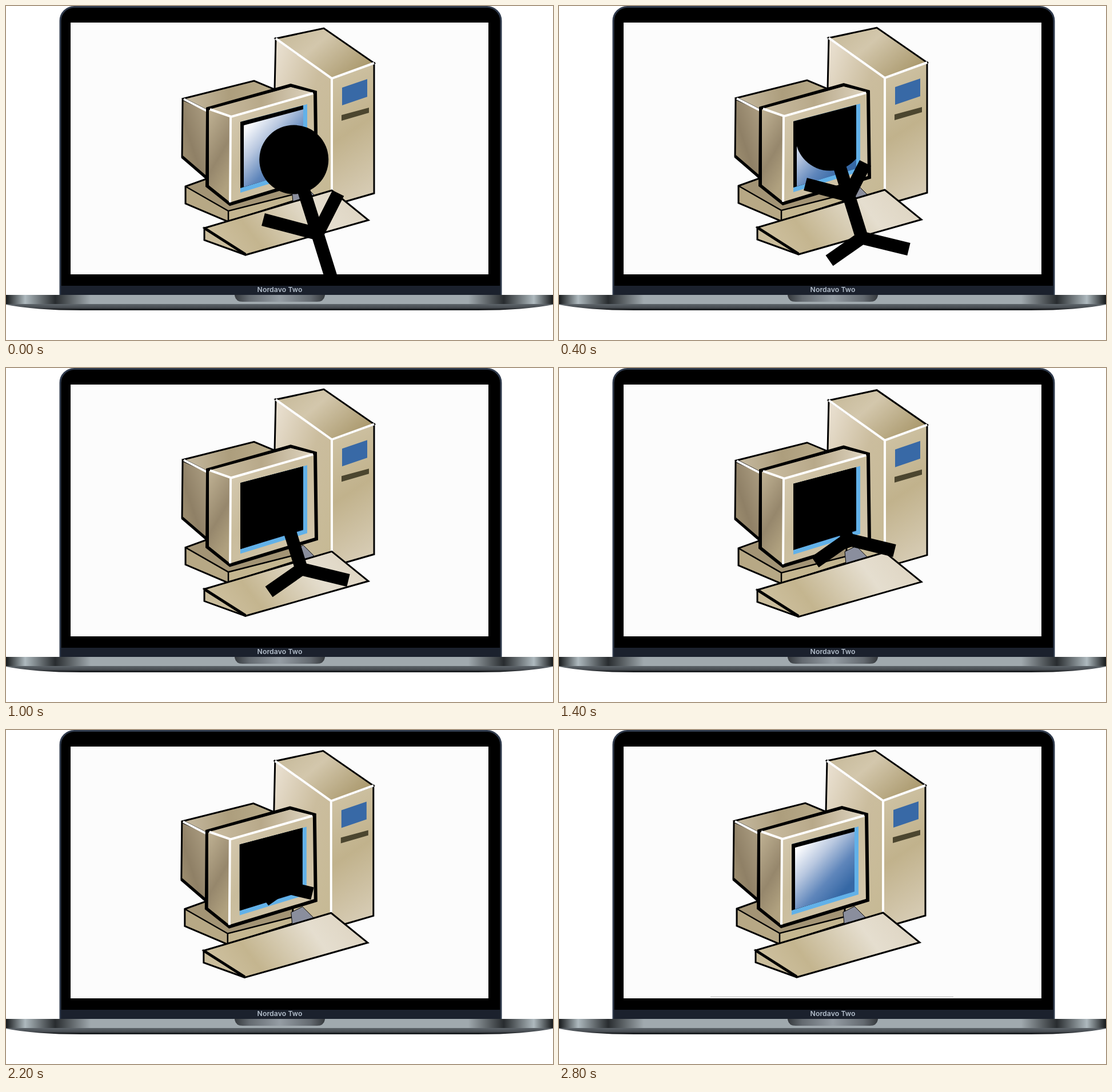
An HTML page that plays this animation: 957x585 px, repeating every 3 s.

```html
<!DOCTYPE html>
<html lang="en">
<head>
<meta charset="utf-8">
<title>Into the screen</title>
<style>
  html, body { margin: 0; width: 100%; height: 100%; overflow: hidden; background: #fff; }
  svg { display: block; width: 957px; height: 585px; }
  text { font: 600 12.2px Inter, sans-serif; letter-spacing: .1px; fill: #b3becb; text-anchor: middle; }
  .ink { stroke: #000; stroke-width: 3; }
  .bold { stroke: #000; stroke-width: 6; }
  .line { fill: none; stroke: #000; stroke-width: 2.5; }
  .heavy { fill: none; stroke: #000; stroke-width: 5; }
  .shine { fill: none; stroke: #fff; stroke-width: 4; }
  #limbs { fill: none; stroke: #000; stroke-width: 22.5; }
  #head { stroke: #000; stroke-width: 121; stroke-linecap: round; }
</style>
</head>
<body>
<svg viewBox="0 0 957 585">
  <defs>
    <linearGradient id="towerSide" x1="0" y1="0" x2="1" y2="1">
      <stop offset="0" stop-color="#ece3d5"/><stop offset=".5" stop-color="#cbbd9e"/><stop offset="1" stop-color="#c6b994"/>
    </linearGradient>
    <linearGradient id="towerTop" x1="0" y1="0" x2="1" y2=".6">
      <stop offset="0" stop-color="#c4b796"/><stop offset=".45" stop-color="#d3c7ac"/><stop offset="1" stop-color="#ac9b70"/>
    </linearGradient>
    <linearGradient id="towerFront" x1=".3" y1="0" x2=".5" y2="1">
      <stop offset="0" stop-color="#cfc3a5"/><stop offset=".5" stop-color="#c1b28c"/><stop offset="1" stop-color="#d6cbb3"/>
    </linearGradient>
    <linearGradient id="backTop">
      <stop offset="0" stop-color="#c6baa1"/><stop offset=".5" stop-color="#ad9e7d"/><stop offset="1" stop-color="#b9ac8b"/>
    </linearGradient>
    <linearGradient id="backSide" x1="1" y1="0" x2="0" y2="1">
      <stop offset="0" stop-color="#b0a286"/><stop offset=".6" stop-color="#8f8066"/><stop offset="1" stop-color="#a39474"/>
    </linearGradient>
    <linearGradient id="boxTop">
      <stop offset="0" stop-color="#cabda2"/><stop offset=".5" stop-color="#b8a98a"/><stop offset="1" stop-color="#ded4c0"/>
    </linearGradient>
    <linearGradient id="boxSide" x1="0" y1="0" x2=".4" y2="1">
      <stop offset="0" stop-color="#c0b294"/><stop offset=".6" stop-color="#96876c"/><stop offset="1" stop-color="#b0a17f"/>
    </linearGradient>
    <linearGradient id="boxFront" x1="0" y1="0" x2="1" y2="1">
      <stop offset="0" stop-color="#ddd2bd"/><stop offset=".5" stop-color="#c9bc9c"/><stop offset="1" stop-color="#d6cab1"/>
    </linearGradient>
    <linearGradient id="glass" gradientUnits="userSpaceOnUse" x1="420" y1="210" x2="502" y2="285">
      <stop offset="0" stop-color="#fff"/><stop offset=".35" stop-color="#b9c8e0"/><stop offset=".7" stop-color="#5f86bb"/><stop offset="1" stop-color="#3668a5"/>
    </linearGradient>
    <linearGradient id="keys" x1="0" y1=".8" x2="1" y2=".5">
      <stop offset="0" stop-color="#d0c3a3"/><stop offset=".3" stop-color="#c4b58f"/><stop offset=".75" stop-color="#e5decf"/><stop offset="1" stop-color="#dfd6c4"/>
    </linearGradient>
    <linearGradient id="metal" x2=".5" spreadMethod="reflect">
      <stop offset="0" stop-color="#16191b"/><stop offset=".07" stop-color="#aeb9be"/><stop offset=".18" stop-color="#282c2f"/><stop offset=".31" stop-color="#a0a9ae"/>
    </linearGradient>
    <linearGradient id="under" x2="0" y2="1">
      <stop offset="0" stop-color="#646c72"/><stop offset=".65" stop-color="#474c51"/><stop offset=".9" stop-color="#15181b"/>
    </linearGradient>
    <linearGradient id="notch" x2=".5" spreadMethod="reflect">
      <stop offset="0" stop-color="#35393d"/><stop offset=".32" stop-color="#646a70"/><stop offset="1" stop-color="#959da4"/>
    </linearGradient>
    <clipPath id="display"><path d="M113 29H844V470H113Z"/></clipPath>
    <clipPath id="screen"><path d="M410 203L520 174V286L410 320Z"/></clipPath>
  </defs>

  <path d="M95 507V26A24.5 24.5 0 0 1 119.5 1.5H841.5A24.5 24.5 0 0 1 866 26V507Z" fill="#000" stroke="#303b4d" stroke-width="3"/>
  <path d="M96 490H865V507H96Z" fill="#1b212d"/>
  <path d="M113 29H844V470H113Z" fill="#fcfcfc"/>
  <text x="479" y="501">Nordavo Two</text>
  <path d="M0 520V523Q50 533 132 533H825Q907 533 957 523V520Z" fill="url(#under)"/>
  <path d="M0 506H957V522H0Z" fill="url(#metal)"/>
  <path d="M400 506H558Q557 518 544 518H414Q401 518 400 506Z" fill="url(#notch)"/>

  <g clip-path="url(#display)">
    <g id="computer">
      <path class="ink" d="M472 57L570 127V325L540 333L500 335L470 146Z" fill="url(#towerSide)"/>
      <path class="ink" d="M570 127L644 100V328L592 343L570 325Z" fill="url(#towerFront)"/>
      <path class="ink" d="M472 57L556 39L644 100L570 127Z" fill="url(#towerTop)"/>
      <path class="shine" d="M472 57L570 127L644 100M570 127V324"/>
      <path d="M588 143L632 128V159L588 174Z" fill="#3869a6"/>
      <path d="M587 191L635 178V187L587 201Z" fill="#4c462f"/>

      <path class="ink" d="M314 316L350 303H503V341L389 378L314 346Z" fill="#a39475"/>
      <path d="M316 318L389 360V376L316 345Z" fill="#b7a885"/>
      <path d="M389 360L502 331V340L389 376Z" fill="#c4b690"/>
      <path class="line" d="M314 316L389 359L503 330M389 359V378"/>
      <path d="M500 322L520 312L541 333L502 343Z" fill="#8a8e9d" stroke="#000"/>

      <path class="ink" d="M311 162L434 131L470 146L354 184Z" fill="url(#backTop)"/>
      <path class="ink" d="M309 164L354 184L352 303L308 264Z" fill="url(#backSide)"/>
      <path class="heavy" d="M308 264L352 302"/>
      <path class="shine" d="M311 163L352 184"/>
      <path class="bold" d="M353 180L498 139L541 151L543 301L392 347L352 315Z" fill="url(#boxFront)"/>
      <path d="M356 181L498 142L538 152L394 194Z" fill="url(#boxTop)"/>
      <path d="M355 182L393 194L391 343L355 314Z" fill="url(#boxSide)"/>
      <path class="shine" d="M357 181L394 194L537 153M393 194L392 344"/>

      <path d="M410 203L527 172V291L410 327Z" fill="#62b1e8"/>
      <path d="M410 203L520 174V285L410 319Z"/>
      <path d="M416 209L520 181V286L416 317Z" fill="url(#glass)"/>
      <path id="dark"/>

      <path class="ink" d="M347 389V410L419 436Z" fill="#cabd9c"/>
      <path class="ink" d="M347 389L570 323L634 375L419 436Z" fill="url(#keys)"/>
      <path class="heavy" d="M347 389L419 435"/>
    </g>
    <path id="rule" d="M265 467.5H690" stroke="#b4b4b4"/>
    <g id="headClip"><path id="head"/></g>
    <path id="limbs"/>
  </g>
</svg>
<script>
const $ = id => document.getElementById(id);
const set = (id, name, value) => $(id).setAttribute(name, value);
const STEP = 200, LOOP = 3000;
const INSIDE = 2, ARMS_IN = 5, GONE = 12, LIT = 13, LAST = 14;

// joints of the rigid figure, measured from the shoulder
const body = {
  head: [-33, -104], neck: [0, 0], handL: [-76, -20], handR: [29, -57],
  hip: [23, 74], footL: [-34, 114], footR: [105, 94]
};

// way of the shoulder: step, x, y, size
const climb = [
  [0, 545, 399, 1.25], [2, 507, 332, 1], [4, 500, 304, 1],
  [7, 482, 226, 1], [9, 477, 217, 1], [11, 473, 230, .6]
];

function along(keys, step) {
  const i = Math.max(1, keys.findIndex(k => k[0] >= step));
  const a = keys[i - 1], b = keys[i];
  const f = (step - a[0]) / (b[0] - a[0]);
  return a.map((v, n) => v + (b[n] - v) * f);
}

function pose(step) {
  const [, x, y, size] = along(climb, step);
  return Object.fromEntries(Object.entries(body)
    .map(([name, [dx, dy]]) => [name, [x + dx * size, y + dy * size]]));
}

const line = (...points) => "M" + points.map(p => p.join(" ")).join("L");

function drawFigure(step) {
  const p = pose(step), inside = step >= INSIDE;
  const arms = step < ARMS_IN
    ? line(p.head, p.neck) + line(p.handL, p.neck, p.handR) : "";
  set("limbs", "d", arms + line(p.neck, p.hip) + line(p.footL, p.hip, p.footR));
  // once inside, the head smears up to the top of the screen
  set("head", "d", line(p.head, [p.head[0], inside ? 100 : p.head[1] + .01]));
  set("headClip", "clip-path", inside ? "url(#screen)" : "none");

  const low = step < ARMS_IN
    ? [[520, p.handR[1]], p.neck, p.handL, [410, p.handL[1]]]
    : [[520, 285], [410, 319]];
  set("dark", "d", step > INSIDE ? line([410, 203], [520, 174], ...low) : "");
}

function draw(step) {
  // the drawing wobbles, then drifts up and left
  const drift = Math.max(0, step - 9);
  const dy = Math.cos(Math.PI * step / 4) - 1 - .4 * drift;
  set("computer", "transform", `translate(${-.6 * drift} ${dy})`);

  const figure = step < GONE;
  if (figure) drawFigure(step);
  for (const id of ["head", "limbs"]) set(id, "visibility", figure ? "visible" : "hidden");
  set("dark", "visibility", step < LIT ? "visible" : "hidden");
  set("rule", "visibility", step === LAST ? "visible" : "hidden");
}

let shown = -1;
function tick() {
  const step = Math.floor(performance.now() % LOOP / STEP);
  if (step !== shown) draw(shown = step);
  requestAnimationFrame(tick);
}
tick();
</script>
</body>
</html>
```
